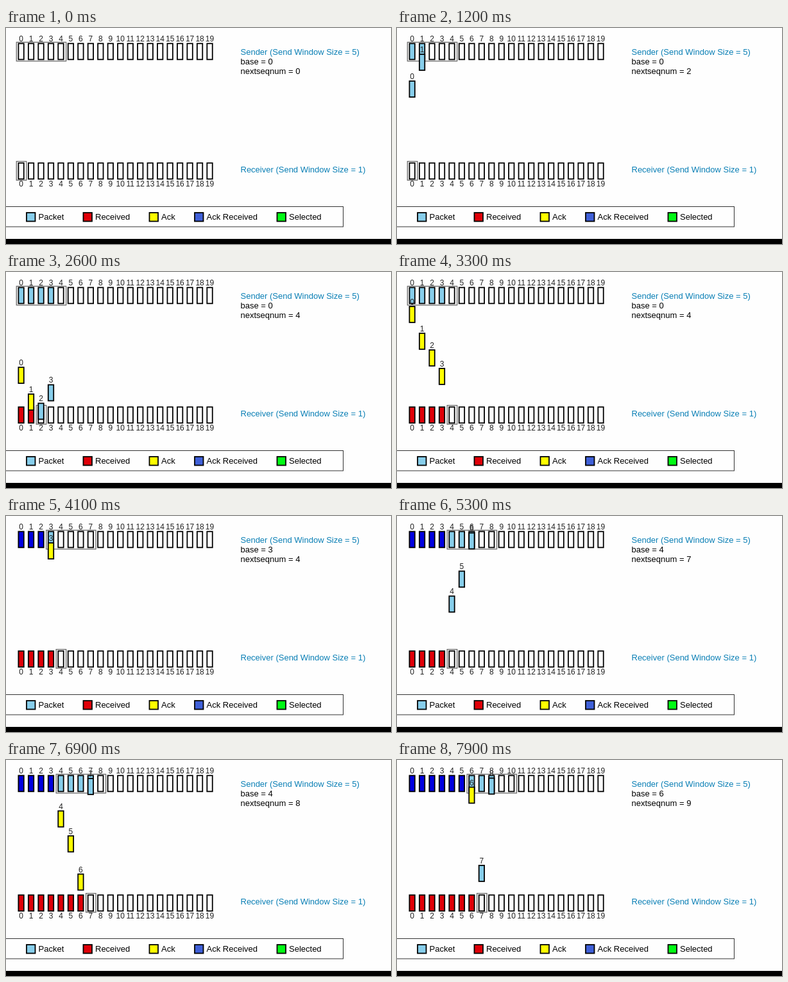
Recreate the animation shown at these times as an HTML page. Size 600 by 338 pixels, loop 8000 ms.

```html
<!DOCTYPE html>
<html lang="en">
<head>
<meta charset="utf-8">
<title>Go-Back-N</title>
<style>
  html, body { margin: 0; width: 100%; height: 100%; overflow: hidden; background: #fefefe; }
  svg { display: block; width: 600px; height: 338px; font: 13px "Liberation Sans", Arial, sans-serif; }
  .num { font-size: 12px; text-anchor: middle; fill: #222; }
  .title { fill: #0a7fb5; }
  .slot { stroke: #000; stroke-width: 1.8; }
  .window { fill: none; stroke: #6a6a6a; stroke-width: 1.3; }
</style>
</head>
<body>
<svg id="stage" viewBox="0 0 600 338"></svg>
<script>
const LOOP = 8000, STEP = 100;
const COUNT = 20, WINDOW = 5;
const SEND_Y = 24, RECV_Y = 211, SPEED = 0.136;
const TRIP = (RECV_Y - SEND_Y) / SPEED;
const departures = [768, 1076, 1268, 1481, 4557, 4844, 5284, 6866, 7870];
const color = {
  empty: '#fefefe', packet: '#87ceeb', received: '#e00008',
  ack: '#ffff00', acked: '#0000e0'
};
const legend = [
  [32, 'Packet', color.packet],
  [120.5, 'Received', color.received],
  [223.5, 'Ack', color.ack],
  [294, 'Ack Received', '#4060d8'],
  [422.5, 'Selected', '#00fa14']
];

const slotX = i => 23.6 + 15.47 * i;
const text = (x, y, content, cls = '') => `<text x="${x}" y="${y}" class="${cls}">${content}</text>`;
const slot = (i, y, fill) =>
  `<rect class="slot" x="${slotX(i) - 4.2}" y="${y + 0.3}" width="8.4" height="25" fill="${fill}"/>`;
const windowBox = (first, size, y) =>
  `<rect class="window" x="${slotX(first) - 7.3}" y="${y}" width="${15.47 * size}" height="29.5"/>`;
const mover = (i, y, fill) => slot(i, y, fill) + text(slotX(i), y - 2.7, i, 'num');

const legendMarkup =
  '<rect x="-2" y="279.5" width="527.5" height="31.5" fill="none" stroke="#333"/>' +
  legend.map(([x, label, fill]) =>
    `<rect class="slot" x="${x}" y="289" width="13.5" height="13.5" fill="${fill}"/>` +
    text(x + 18.5, 300, label)).join('') +
  '<rect y="330" width="600" height="8"/>';

function scene(t) {
  const elapsed = departures.map(d => t - d);
  const passed = delay => elapsed.filter(e => e >= delay).length;
  const next = passed(0), expected = passed(TRIP), base = passed(2 * TRIP);
  let slots = '', movers = '';

  for (let i = 0; i < COUNT; i++) {
    const sent = i < base ? color.acked : i < next ? color.packet : color.empty;
    slots += slot(i, SEND_Y, sent) + text(slotX(i), 21.3, i, 'num');
    slots += slot(i, RECV_Y, i < expected ? color.received : color.empty) +
      text(slotX(i), 248, i, 'num');
  }
  for (let i = base; i < next; i++) {
    const acking = elapsed[i] >= TRIP;
    const travelled = acking ? 2 * TRIP - elapsed[i] : elapsed[i];
    movers += mover(i, SEND_Y + travelled * SPEED, acking ? color.ack : color.packet);
  }

  return slots + windowBox(base, WINDOW, 22.3) + windowBox(expected, 1, 208.7) + movers +
    text(365.5, 42, `Sender (Send Window Size = ${WINDOW})`, 'title') +
    text(365.5, 57, `base = ${base}`) +
    text(365.5, 72, `nextseqnum = ${next}`) +
    text(365.5, 226, 'Receiver (Send Window Size = 1)', 'title') +
    legendMarkup;
}

const stage = document.getElementById('stage');
const start = performance.now();
let shown = -1;

function frame() {
  const elapsed = Math.max(0, performance.now() - start) % LOOP;
  const t = Math.floor(elapsed / STEP) * STEP;
  if (t !== shown) {
    stage.innerHTML = scene(t);
    shown = t;
  }
  requestAnimationFrame(frame);
}
frame();
</script>
</body>
</html>
```
